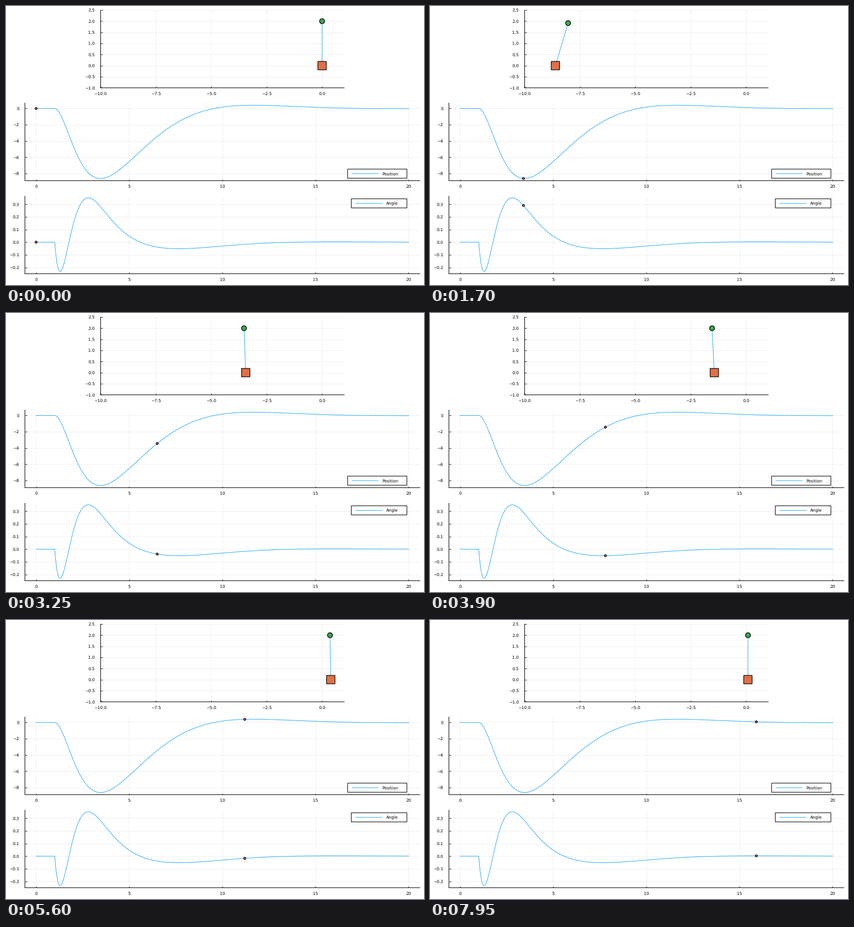
A matplotlib script for the animation above (8000 ms loop, 917 px wide and 611 px high).

```python
import numpy as np
import matplotlib.pyplot as plt
from matplotlib.animation import FuncAnimation
from matplotlib.patches import Ellipse, Rectangle

W, H, DPI = 917, 611, 100
PX = 72 / DPI  # points per pixel
FRAMES, INTERVAL, DT = 160, 50, 0.1
KICK = 1.0     # time of the disturbance
ROD = 2.0

BLUE, ORANGE, GREEN = "#009afa", "#e26f46", "#3da44d"

plt.rcParams["font.family"] = "DejaVu Sans"
plt.rcParams["text.hinting"] = "none"
FONT = 9.2 * PX
CURVE = dict(color=BLUE, lw=0.95 * PX, snap=False)


def cart_pos(t):
    """Cart position: a slow and a fast damped mode after the kick."""
    s = np.maximum(np.asarray(t, float) - KICK, 0)
    slow = -28.5 * np.exp(-0.367 * s) * np.sin(0.375 * s - 0.0645)
    fast = np.exp(-1.485 * s) * (7.828 * np.sin(1.1 * s) - 1.837 * np.cos(1.1 * s))
    return slow + fast


def rod_angle(t):
    """Rod angle: the same two modes plus the free fall of the rod."""
    s = np.maximum(np.asarray(t, float) - KICK, 0)
    slow = 0.84 * np.exp(-0.367 * s) * np.sin(1.7126 - 0.375 * s)
    fast = np.exp(-1.485 * s) * (2.19 * np.cos(1.1 * s) + 1.7115 * np.sin(1.1 * s))
    return slow - fast + 1.3584 * np.exp(-2.215 * s)


fig = plt.figure(figsize=(W / DPI, H / DPI), dpi=DPI, facecolor="white")


def label(x, y, text, ha="center"):
    fig.text(x / W, 1 - (y + 3.3) / H, text, ha=ha, va="baseline",
             fontsize=FONT, color="black")


def panel(box, xlim, ylim, xticks, yticks, xfmt, yfmt):
    """Axes at a pixel box (left, top, right, bottom) with its tick labels."""
    left, top, right, bottom = box
    ax = fig.add_axes([left / W, 1 - bottom / H, (right - left) / W, (bottom - top) / H])
    ax.set(xlim=xlim, ylim=ylim, xticks=xticks, yticks=yticks, facecolor="none")
    ax.set_axisbelow(True)
    ax.grid(color="black", alpha=0.065, linewidth=PX)
    ax.tick_params(direction="in", length=3.5 * PX, width=PX,
                   labelleft=False, labelbottom=False)
    for side in ("top", "right"):
        ax.spines[side].set_visible(False)
    for side in ("left", "bottom"):
        ax.spines[side].set(linewidth=1.2 * PX, snap=False)
    for v in xticks:
        x = left + (v - xlim[0]) / (xlim[1] - xlim[0]) * (right - left)
        label(x, bottom + 12.3, format(v, xfmt).replace("-", "−"))
    for v in yticks:
        y = bottom - (v - ylim[0]) / (ylim[1] - ylim[0]) * (bottom - top)
        label(left - 12.7, y, format(v, yfmt).replace("-", "−"), ha="right")
    return ax


def marker(ax, shape, size, fill):
    """A round or square patch of a given pixel size, free of pixel snapping."""
    (x0, y0), (x1, y1) = ax.transData.inverted().transform([(0, 0), (size, size)])
    patch = shape((0, 0), x1 - x0, y1 - y0, fc=fill, ec="black", lw=1.4 * PX,
                  clip_on=False, snap=False, zorder=5)
    return ax.add_patch(patch)


def legend(left, top, right, bottom, text, text_x):
    fig.add_artist(Rectangle((left / W, 1 - bottom / H), (right - left) / W,
                             (bottom - top) / H, transform=fig.transFigure,
                             fc="white", ec="black", lw=1.2 * PX, snap=False))
    mid = (top + bottom) / 2
    fig.add_artist(plt.Line2D([(left + 9.5) / W, (left + 67.5) / W],
                              [1 - mid / H] * 2, **CURVE))
    label(text_x, mid, text)


cart_ax = panel((207.5, 9, 742, 179.2), (-10, 1), (-1, 2.5),
                np.arange(-10, 0.1, 2.5), np.arange(-1, 2.6, 0.5), ".1f", ".1f")
pos_ax = panel((41.5, 212.5, 908, 382.5), (-0.6, 20.6), (-8.88, 0.674),
               range(0, 21, 5), range(-8, 1, 2), "d", "d")
ang_ax = panel((41.5, 416.5, 908, 586.3), (-0.6, 20.6), (-0.2495, 0.3636),
               range(0, 21, 5), (-0.2, -0.1, 0.0, 0.1, 0.2, 0.3), "d", ".1f")

time = np.linspace(0, 20, 2001)
pos_ax.plot(time, cart_pos(time), **CURVE)
ang_ax.plot(time, rod_angle(time), **CURVE)
legend(749.5, 357.2, 879.5, 377.2, "Position", 842.7)
legend(757.5, 422.2, 879.5, 442.2, "Angle", 847.2)

rod, = cart_ax.plot([], [], **CURVE)
cart = marker(cart_ax, Rectangle, 18.4, ORANGE)
bob = marker(cart_ax, Ellipse, 11, GREEN)
pos_dot = marker(pos_ax, Ellipse, 4.6, ORANGE)
ang_dot = marker(ang_ax, Ellipse, 4.6, ORANGE)


def update(i):
    t = i * DT
    x, a = float(cart_pos(t)), float(rod_angle(t))
    tip = x + ROD * np.sin(a), ROD * np.cos(a)
    rod.set_data([x, tip[0]], [0, tip[1]])
    cart.set_xy((x - cart.get_width() / 2, -cart.get_height() / 2))
    bob.set_center(tip)
    pos_dot.set_center((t, x))
    ang_dot.set_center((t, a))
    return rod, cart, bob, pos_dot, ang_dot


anim = FuncAnimation(fig, update, frames=FRAMES, interval=INTERVAL,
                     repeat=True, repeat_delay=0, blit=False)
plt.show()
```
